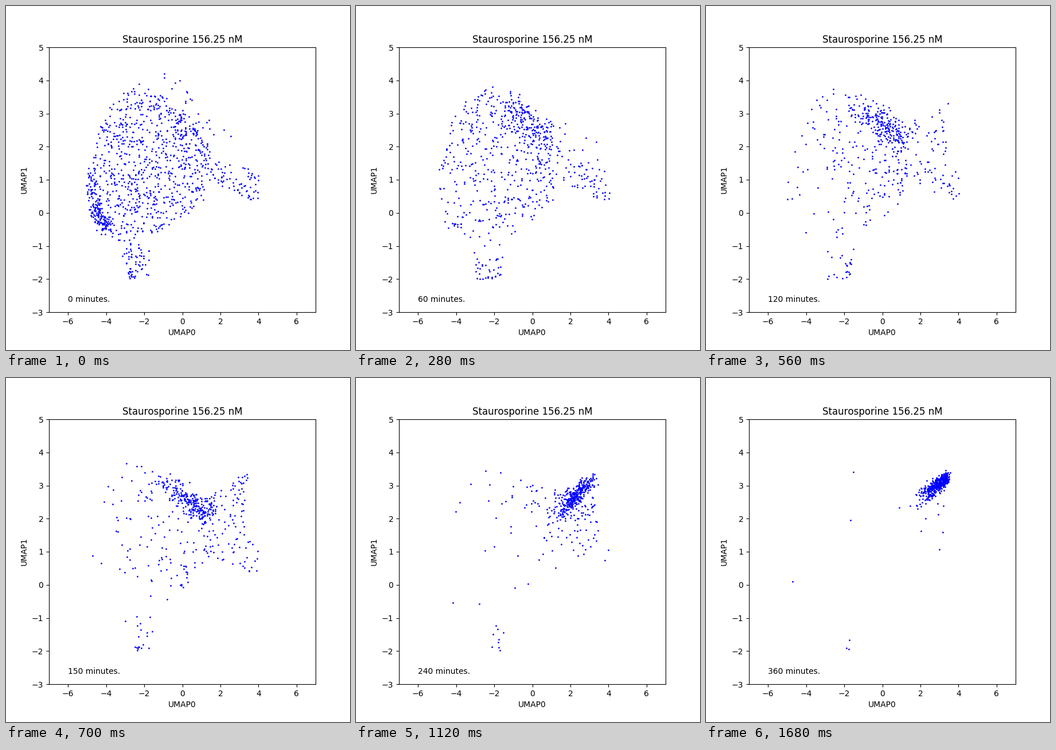
Animation of 600x600 px, one loop 1820 ms. Source, as a matplotlib script:

```python
import numpy as np
import matplotlib.pyplot as plt
from matplotlib.animation import FuncAnimation
from matplotlib.path import Path

FRAMES, STEP_MS, STEP_MIN = 13, 140, 30

# Outlines of the regions that cells occupy
BODY = [(-2.7, 3.8), (-.8, 3.35), (.9, 2.45), (1.5, 1.9), (1.1, .4), (0, -.2),
        (-1.1, -.65), (-4.2, -.65), (-4.9, 0), (-5.12, .8), (-4.3, 2.7), (-3.6, 3.4)]
TAIL = [(-3.4, -.7), (-2.2, -.7), (-1.4, -1.1), (-1.7, -1.98), (-2.9, -2.02)]
ARM = [(1.3, 2.1), (2.2, 1.5), (4, 1.25), (4.07, .42), (3.4, .4), (1.5, .9)]
SKIRT = [(.2, 2.3), (2, 2.2), (3.2, 2.9), (3.55, 1.4), (2.6, .9), (1, .4)]
WAKE = [(-.6, 3), (.2, 3.15), (1.2, 2.9), (1.4, 2.1), (.1, 1.7)]
SHELF = [(1.35, 2.35), (1.85, 2.92), (2.5, 2.95), (2.6, 2.6), (1.9, 2.25)]

# Dense bands
RIDGE = [(-2.4, 3.4), (-1.2, 3.12), (-.3, 2.83), (.4, 2.5), (1.2, 2.2),
         (1.8, 2.42), (2.3, 2.72), (2.8, 3), (3.4, 3.26)]
EDGE = [(-4.85, 1.1), (-4.7, .4), (-4.45, 0), (-4.2, -.32), (-3.8, -.45)]


def decay(h, start, rate, bend=0):
    return start * np.exp(-rate * h - bend * h * h)


def bump(h, peak, centre, width):
    return peak * np.exp(-((h - centre) / width) ** 2)


def rise(h, centre, rate):
    return 1 / (1 + np.exp(-rate * (h - centre)))


def fill(rng, poly, n, tilt=(0, 0)):
    """n points inside poly, denser in the direction of tilt."""
    poly = np.array(poly)
    pool = rng.uniform(poly.min(0), poly.max(0), (5000, 2))
    pool = pool[Path(poly).contains_points(pool)]
    weight = np.exp(pool @ np.array(tilt))
    return pool[rng.choice(len(pool), round(n), replace=False, p=weight / weight.sum())]


def along(rng, path, n, mean, sd, width):
    """n points around a polyline; width holds to its middle, then tapers."""
    n, path = round(n), np.array(path)
    last = len(path) - 1
    u = np.clip(last - np.abs(last - rng.normal(mean, sd, n)), 0, last)
    knots = np.arange(last + 1)
    centre = np.column_stack([np.interp(u, knots, c) for c in path.T])
    spread = np.interp(u, (last / 2, last), width)
    return centre + rng.normal(0, 1, (n, 2)) * spread[:, None]


def cells(minute):
    """The population drifts along the ridge from the body to its far tip."""
    rng = np.random.default_rng(100 + minute)
    h = minute / 60
    lean = .3 * min(h / 2, 1)
    return np.vstack([
        fill(rng, BODY, decay(h, 720, .5, .06), (lean, lean)),
        fill(rng, TAIL, decay(h, 65, .5), (h - .6, -1 - h)),
        fill(rng, ARM, decay(h, 72, .25, .07), (.4, 0)),
        fill(rng, SKIRT, bump(h, 65, 3.2, 1.8), (.13 * h, .8)),
        fill(rng, WAKE, bump(h, 24, 3.8, .8), (.3, .3)),
        fill(rng, SHELF, 40 * rise(h, 4, 3), (1, 2)),
        along(rng, RIDGE, 110 + 45 * h, 2 + 5.4 * rise(h, 3.3, 1.4),
              1.2 - .08 * h, (.2 + decay(h, .2, 1), .09)),
        along(rng, RIDGE, bump(h, 38, 3.2, .8), 7.1, .45, (.12, .1)),
        along(rng, EDGE, decay(h, 130, 2.4), 2.4, 1.3, (.15, .15)),
    ])


plt.rcParams["text.kerning_factor"] = 6
fig, ax = plt.subplots(figsize=(6, 6), dpi=100)
ax.set(xlim=(-7, 7), ylim=(-3, 5), xlabel="UMAP0", ylabel="UMAP1",
       title="Staurosporine 156.25 nM")
dots, = ax.plot([], [], "b.", markersize=2)
clock = ax.text(-6, -2.68, "")


def draw(i):
    minute = i * STEP_MIN
    dots.set_data(*cells(minute).T)
    clock.set_text(f"{minute} minutes.")
    return dots, clock


anim = FuncAnimation(fig, draw, frames=FRAMES, interval=STEP_MS,
                     repeat=True, repeat_delay=0)
plt.show()
```
